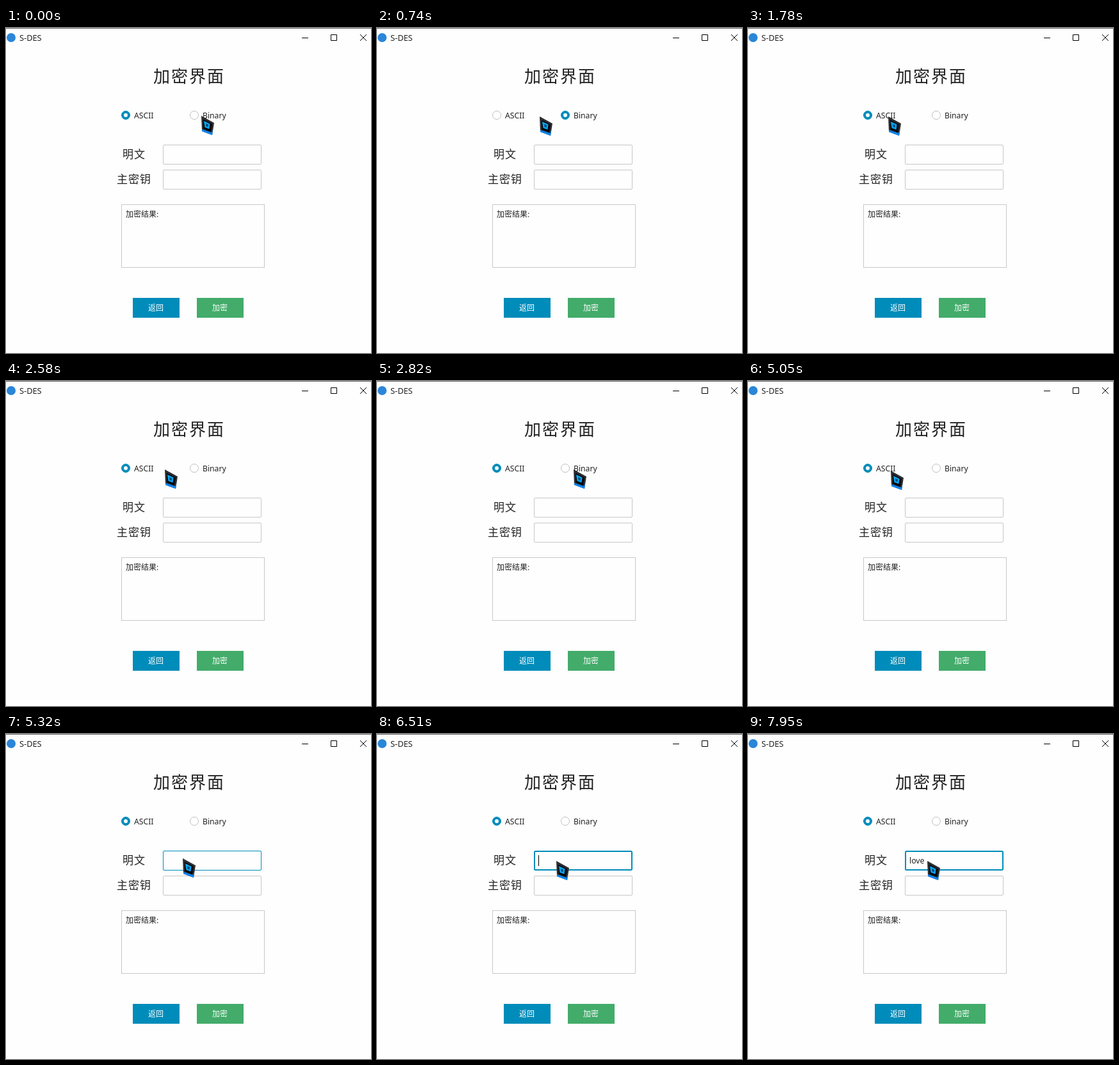
An HTML page that plays this animation: 570 px wide and 507 px high, repeating every 8 s.

```html
<!DOCTYPE html>
<html lang="zh-CN">
<head>
<meta charset="utf-8">
<title>S-DES</title>
<style>
html, body { margin: 0; width: 100%; height: 100%; overflow: hidden; background: #fefefe; }
svg { display: block; }
text { font-family: "Noto Sans", "Noto Sans CJK SC", "Noto Sans CJK", sans-serif; font-size: 12.2px; fill: #222; white-space: pre; }
.zh { font-family: "Noto Sans CJK SC", "Noto Sans CJK", sans-serif; font-size: 12px; }
.head { font-size: 26px; letter-spacing: 2px; }
.label { font-size: 17px; letter-spacing: 1px; }
.btn { fill: #fff; text-anchor: middle; }
.box { fill: #fefefe; stroke: #c8c8c8; }
.ctl { fill: none; stroke: #000; }
</style>
</head>
<body>
<svg width="570" height="507" viewBox="0 0 570 507">
  <rect width="570" height="507" fill="#fefefe"/>
  <rect width="570" height="1" fill="#666"/>
  <circle cx="8" cy="15" r="7" fill="#2a86d8"/>
  <text x="21" y="20" style="font-size:12.8px">S-DES</text>
  <path class="ctl" d="M462 15.5H472M507.5 10.5h9v9h-9z"/>
  <path class="ctl" d="M553 10L563 20M563 10L553 20"/>

  <text class="zh head" x="230" y="84.5">加密界面</text>
  <g id="radios"></g>
  <text x="200" y="141">ASCII</text>
  <text x="307" y="141">Binary</text>

  <text class="zh label" x="182" y="202.500">明文</text>
  <text class="zh label" x="173" y="241.500">主密钥</text>
  <rect id="field" class="box" x="245.5" y="182.500" width="153" height="30" rx="1.5"/>
  <rect id="ring" x="246.5" y="183.5" width="151" height="28" fill="none" stroke="#008cba"/>
  <rect class="box" x="245.5" y="221.5" width="153" height="30" rx="1.5"/>
  <text id="typed" x="252" y="202"></text>
  <rect id="caret" y="189" width="1" height="17" fill="#000"/>

  <rect class="box" x="180.5" y="275.5" width="223" height="98"/>
  <text class="zh" x="187" y="295">加密结果:</text>
  <rect x="198" y="421" width="73" height="31" fill="#008cba"/>
  <rect x="298" y="421" width="73" height="31" fill="#43ac6a"/>
  <text class="zh btn" x="234" y="441">返回</text>
  <text class="zh btn" x="334" y="441">加密</text>

  <g id="pointer">
    <circle id="press" cx="1.5" cy="1.5" r="10.5" fill="#ff0" fill-opacity=".47"/>
    <path d="M0 0L20 11L17 30L1 24Z" fill="#2b2d31"/>
    <path d="M1 21L16 26L18 21L17 30L1 24Z" fill="#0a84f0"/>
    <path d="M3 5.500L17 12.500L15 25L3.500 20.500Z" fill="#05070c"/>
    <path d="M4 8L13.500 12.500L12.500 20.500L5.500 18Z" fill="#0aa8f5"/>
    <path d="M7 12L11 13.500L10.500 17.500L7.500 16.500Z" fill="#06507e"/>
  </g>
</svg>
<script>
const LOOP = 8000, BLUE = "#008cba", GREY = "#c0c0c0";
const $ = id => document.getElementById(id);

// Each move: begin, end, steps, then stops as [progress, x, y]
const moves = [
  [510, 940, 16, [[0, 305, 137], [1, 219, 138]]],
  [2460, 2820, 13, [[0, 219, 138], [1, 307, 138]]],
  [3960, 4350, 13, [[0, 307, 138], [.385, 300, 147], [1, 222, 139]]],
  [5050, 5380, 12, [[0, 222, 139], [1, 280, 198]]]
];
const clicks = [[20, 140], [1630, 1780], [3290, 3340], [4590, 4710], [5620, 5740]];
const modes = [[0, 0], [140, 1], [1780, 0], [3340, 1], [4710, 0]];
const typing = [[0, ""], [7010, "l"], [7190, "lo"], [7370, "lov"], [7800, "love"]];
const blinks = [[5620, 6200], [6510, 7950]];

const inside = (spans, t) => spans.some(([a, b]) => t >= a && t < b);
const latest = (list, t) => list.filter(e => e[0] <= t).pop()[1];
const ease = p => p * p * (3 - 2 * p);
const show = (el, on) => el.setAttribute("visibility", on ? "visible" : "hidden");

function pointerAt(t) {
  let pos = [305, 137];
  for (const [begin, end, steps, stops] of moves) {
    if (t < begin) break;
    const gap = (end - begin) / (steps - 1);
    const p = Math.min(1, (Math.floor((t - begin) / gap) + 1) / steps);
    const i = Math.max(1, stops.findIndex(s => s[0] >= p));
    const a = stops[i - 1], b = stops[i];
    const k = ease((p - a[0]) / (b[0] - a[0]));
    pos = [1, 2].map(n => Math.round(a[n] + (b[n] - a[n]) * k));
  }
  return pos;
}

const radios = [187, 294].map(x => {
  const make = r => {
    const c = document.createElementNS("http://www.w3.org/2000/svg", "circle");
    c.setAttribute("cx", x);
    c.setAttribute("cy", 136);
    c.setAttribute("r", r);
    return $("radios").appendChild(c);
  };
  const disc = make(6.5), dot = make(3);
  dot.setAttribute("fill", "#fff");
  return disc;
});

function draw(t) {
  const [x, y] = pointerAt(t);
  $("pointer").setAttribute("transform", `translate(${x} ${y})`);
  show($("press"), inside(clicks, t));

  const mode = latest(modes, t);
  radios.forEach((disc, i) => {
    disc.setAttribute("fill", i === mode ? BLUE : "#fff");
    disc.setAttribute("stroke", i === mode ? BLUE : GREY);
  });

  const hover = x >= 245 && x < 399 && y >= 182 && y < 213;
  $("field").style.stroke = hover ? BLUE : "";
  show($("ring"), t >= 5620);

  const word = latest(typing, t);
  $("typed").textContent = word;
  $("caret").setAttribute("x", [252, 255, 262, 269, 276][word.length]);
  show($("caret"), inside(blinks, t));
}

const start = performance.now();
function tick() {
  draw((performance.now() - start) % LOOP);
  requestAnimationFrame(tick);
}
tick();
</script>
</body>
</html>
```
